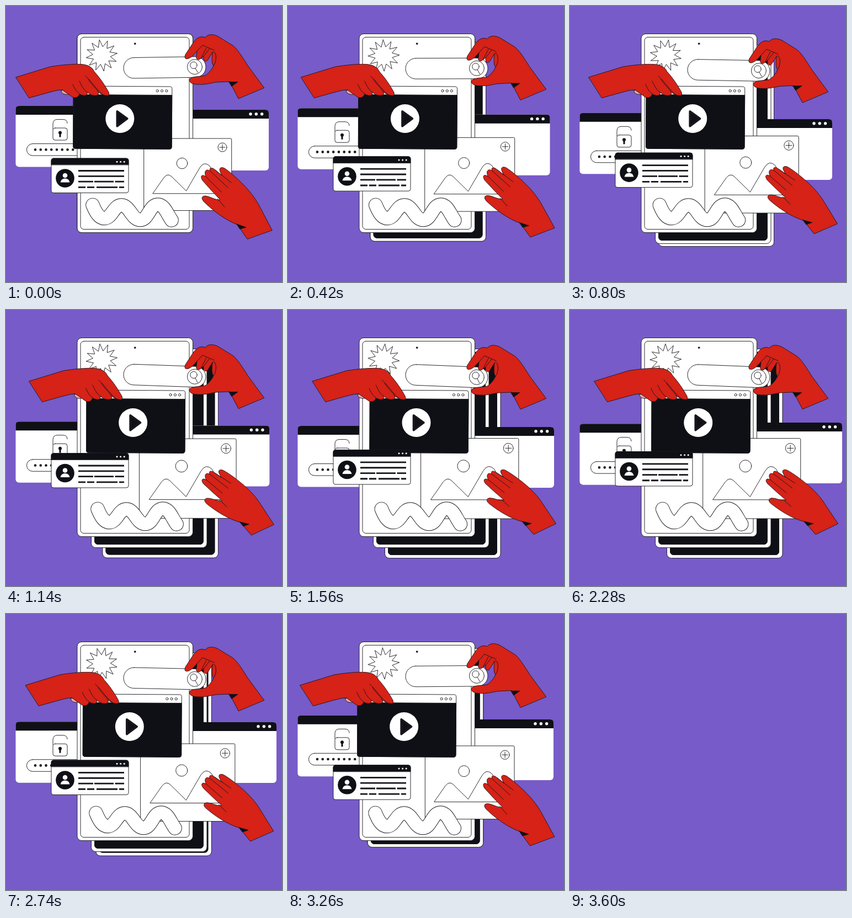
An HTML page for the animation above (3620 ms loop, 500x500 px).

```html
<!DOCTYPE html>
<html lang="en">
<head>
<meta charset="utf-8">
<title>Hands arranging windows</title>
<style>
  html, body { margin: 0; width: 100%; height: 100%; overflow: hidden; background: #775bc8; }
  svg { display: block; width: 100vw; height: 100vh; }
  svg * { vector-effect: non-scaling-stroke; }
  #scene { fill: none; stroke: #16161b; stroke-linecap: round; stroke-linejoin: round; stroke-width: .9; }
  .w { fill: #fff; }
  .k { fill: #0f1016; }
  .r { fill: #d62217; }
  .n { stroke: none; }
</style>
</head>
<body>
<svg viewBox="0 0 500 500">
  <defs>
    <g id="sheet">
      <rect class="w" x="129" y="50.5" width="209.5" height="360" rx="8"/>
      <rect x="135" y="56.5" width="197" height="348" rx="6"/>
    </g>
  </defs>
  <g id="scene">
    <g id="back"><use href="#sheet"/><rect class="k" x="135" y="56.5" width="197" height="348" rx="6"/></g>
    <g id="middle"><use href="#sheet"/><rect class="k" x="135" y="56.5" width="197" height="348" rx="6"/></g>

    <g id="plain" class="n">
      <rect class="w" x="300" y="188" width="176" height="110" rx="6"/>
      <path class="k" d="M300 204V188H470Q476 188 476 194V204Z"/>
      <g class="w"><circle cx="443" cy="195.7" r="2.7"/><circle cx="453.3" cy="195.7" r="2.7"/><circle cx="463.6" cy="195.7" r="2.7"/></g>
    </g>

    <g id="login">
      <rect class="w n" x="17.5" y="181" width="140" height="110.5" rx="6"/>
      <path class="k n" d="M17.5 197V187Q17.5 181 23.5 181H150V197Z"/>
      <rect x="85" y="221" width="26" height="22" rx="4"/>
      <path d="M85 223V214Q85 205.5 93 205.5H103Q111 205.5 111 212.5"/>
      <circle class="k n" cx="98" cy="229.5" r="3"/>
      <rect class="k n" x="96.5" y="230" width="3" height="7.5"/>
      <rect x="37.5" y="249.5" width="130" height="21.5" rx="10.7"/>
      <path d="M53 260.2H124" stroke-width="4.6" stroke-dasharray="0 9.75"/>
    </g>

    <use href="#sheet"/>
    <circle class="k n" cx="233.7" cy="68.2" r="1.8"/>
    <polygon id="star"/>

    <g id="search">
      <rect class="w" x="213" y="93.5" width="149" height="37.5" rx="18.7"/>
      <circle cx="342" cy="112" r="13.5"/>
      <circle cx="340" cy="109" r="6.2"/>
      <path d="M343 114.5L347.5 122.5"/>
    </g>

    <g id="photo">
      <rect class="w" x="249.7" y="240" width="159" height="130.5" rx="2"/>
      <circle cx="319" cy="285" r="9.8"/>
      <path d="M266 339.5L286 311Q293 302 300 309L326.5 335L351 293Q359 280 369 290L397 339.5Z"/>
      <circle cx="392" cy="256" r="8"/>
      <path d="M387 256H397M392 251V261"/>
    </g>

    <g id="worm"></g>

    <g id="video">
      <g transform="rotate(.35 211 202)">
        <rect class="w" x="122" y="145.5" width="178.5" height="113.3" rx="4"/>
        <path class="k" d="M122 161H300.5V255Q300.5 258.8 296.5 258.8H126Q122 258.8 122 255Z"/>
        <circle cx="274" cy="153.3" r="2.1"/><circle cx="282.2" cy="153.3" r="2.1"/><circle cx="290.4" cy="153.3" r="2.1"/>
      </g>
      <circle class="w n" cx="206.3" cy="204" r="26"/>
      <path class="k" stroke-width="4" d="M201.5 191L219.5 204L201.5 217.5Z"/>
    </g>

    <g id="profile">
      <rect class="w" x="82" y="276" width="140" height="62.5" rx="4"/>
      <path class="k" d="M82 287.5V280Q82 276 86 276H218Q222 276 222 280V287.5Z"/>
      <g class="w n"><circle cx="201" cy="282.2" r="1.5"/><circle cx="207.6" cy="282.2" r="1.5"/><circle cx="214.2" cy="282.2" r="1.5"/></g>
      <circle class="k n" cx="107" cy="312" r="16.8"/>
      <circle class="w n" cx="107" cy="307" r="4.3"/>
      <path class="w n" d="M98.5 319.5Q100 312.5 107 312.5T115.500 319.5Z"/>
      <path stroke-width="2.8" stroke-linecap="butt" d="M131 298.5H214M131 308.3H214M131 318.200H158M160 318.200H195M197.500 318.200H214M131 328.300H144M147 328.300H160M164 328.300H202M205 328.300H214"/>
    </g>

    <g id="leftHand">
      <path fill="#e9a3a6" d="M100 153C100 159 106 161 113 160L110 153Z"/>
      <path class="r" d="M18 129L80 110C105 106 122 105 136 105.500C150 106.500 157 112 160 119C171 131 180 145 186 156C188 161 186 163 181 162C174 161 169 158 166 154C171 160 165 163 159 162C153 161 150 159 147 156C149 163 140 164 133 159C132 166 124 168 119 164L102 152C92 152 84 155 76 157L42 166.500Z"/>
      <path d="M144 127C154 135 164 152 176 161M149 133C158 146 166 152 166 154M133 136C138 147 142 153 147 156M121 142C125 152 129 156 133 159"/>
    </g>

    <g id="topHand">
      <path class="r" d="M467.500 148L438 108C428 92 418 76 410 71L384 55C376 51 366 50 361 57C351 53 344 59 338 68L325 88C322 95 326 97 331 95C338 92 342 86 346 82L345 90C343 97 349 99 353 95L358 91C357 101 363 102 366 97L374 84C373 94 372 104 376 108C373 115 367 122 361 126C352 128 340 127 334 131C329 136 335 142 347 142C362 143 372 139 382 138L405 137L421 167.500Z"/>
      <path d="M345 83L356 71L377 80M353 95L363 76M358 91L369 77M374 84C380 78 384 98 376 108"/>
      <path class="k" d="M404 137.500H420L409 145.500Z"/>
    </g>

    <g id="lowHand">
      <path class="r" d="M437 422L419 396C395 387 372 368 358 354C353 348 355 344 361 344C370 345 379 352 388 351L372 334L356 316C351 308 355 304 362 309C358 299 363 294 370 299C367 292 374 292 379 297L391 307L388 300C385 293 390 291 396 294C408 302 425 318 437 331C450 346 456 356 461 366L482 406Z"/>
      <path d="M362 309L390 337M370 299L402 329M379 297L408 320M383 349L396 364"/>
      <path class="k" d="M418 395L435 401L424 404Z"/>
    </g>
  </g>
</svg>
<script>
const LOOP = 3620, TURN = 3600;
const $ = id => document.getElementById(id);
const place = (id, transform) => $(id).setAttribute('transform', transform);

const ease = x => {
  x = Math.min(1, Math.max(0, x));
  return x * x * (3 - 2 * x);
};

// Star and wavy tube
const SPIKES = 12;
$('star').setAttribute('points', Array.from({ length: SPIKES * 2 }, (_, i) => {
  const angle = i * Math.PI / SPIKES, radius = i % 2 ? 16 : 28.5;
  return [radius * Math.sin(angle), -radius * Math.cos(angle)].map(v => v.toFixed(2));
}).join(' '));

const wave = 'M157 360.500C163 375 169 384.500 178 384.500C192 384.500 195 361 209 361C224 361 228 387.500 243 387.500C258 387.500 260 360 275 360C287 360 292 377 300 388';
$('worm').innerHTML = `<path d="${wave}" stroke-width="25.5"/><path d="${wave}" stroke="#fff" stroke-width="23.7"/>`;

// Closed drift of the right window: [time, x, y]
const drift = [[0, 0, 0], [800, -1, 17], [1560, 6, 24], [2280, 17, 16], [2740, 14, 8], [3260, 5, 3]];
const knot = i => {
  const n = drift.length, turn = Math.floor(i / n), [t, x, y] = drift[i - turn * n];
  return [t + turn * TURN, x, y];
};

function driftAt(t) {
  let i = drift.length - 1;
  while (drift[i][0] > t) i--;
  const [a, b, c, d] = [-1, 0, 1, 2].map(k => knot(i + k));
  const span = c[0] - b[0], s = (t - b[0]) / span;
  return [1, 2].map(k => {
    const m0 = (c[k] - a[k]) / (c[0] - a[0]) * span;
    const m1 = (d[k] - b[k]) / (d[0] - b[0]) * span;
    return b[k] + (c[k] - b[k]) * ease(s) + m0 * s * (1 - s) ** 2 - m1 * s * s * (1 - s);
  });
}

function draw(t) {
  $('scene').style.display = t < TURN ? '' : 'none';
  if (t >= TURN) return;

  const u = Math.min(t, TURN - t);       // out and back
  const slow = ease(u / 1800), grab = ease(u / 1400);
  const first = ease(u / 600), second = ease((u - 600) / 600);

  place('middle', `translate(${25.5 * first} ${20 * first})`);
  place('back', `translate(${25.5 * first + 21 * second} ${20 * first + 19 * second})`);
  place('plain', `translate(${driftAt(t)})`);
  place('login', `translate(0 ${30.5 * slow})`);
  place('profile', `translate(0 ${-23.7 * slow})`);
  place('worm', `translate(${13 * slow} 0)`);
  place('star', `translate(173.3 89.7) rotate(${45 * slow - 8})`);

  place('video', `translate(${26.2 * grab} 0)`);
  place('leftHand', `translate(${26.2 * grab} 0)`);
  place('search', `translate(0 ${5.3 * grab}) rotate(${3.2 * grab - .9} 232 112)`);
  place('topHand', `translate(0 ${12 * grab})`);
  place('photo', `translate(329 305) scale(${1 + .115 * grab}) translate(-329 -305)`);
  place('lowHand', `translate(${356 + 5 * grab} ${346 - 3 * grab}) rotate(${-6.1 * grab}) scale(${1 - .055 * grab}) translate(-356 -346)`);
}

const start = performance.now();
function tick() {
  draw((performance.now() - start) % LOOP);
  requestAnimationFrame(tick);
}
tick();
</script>
</body>
</html>
```
